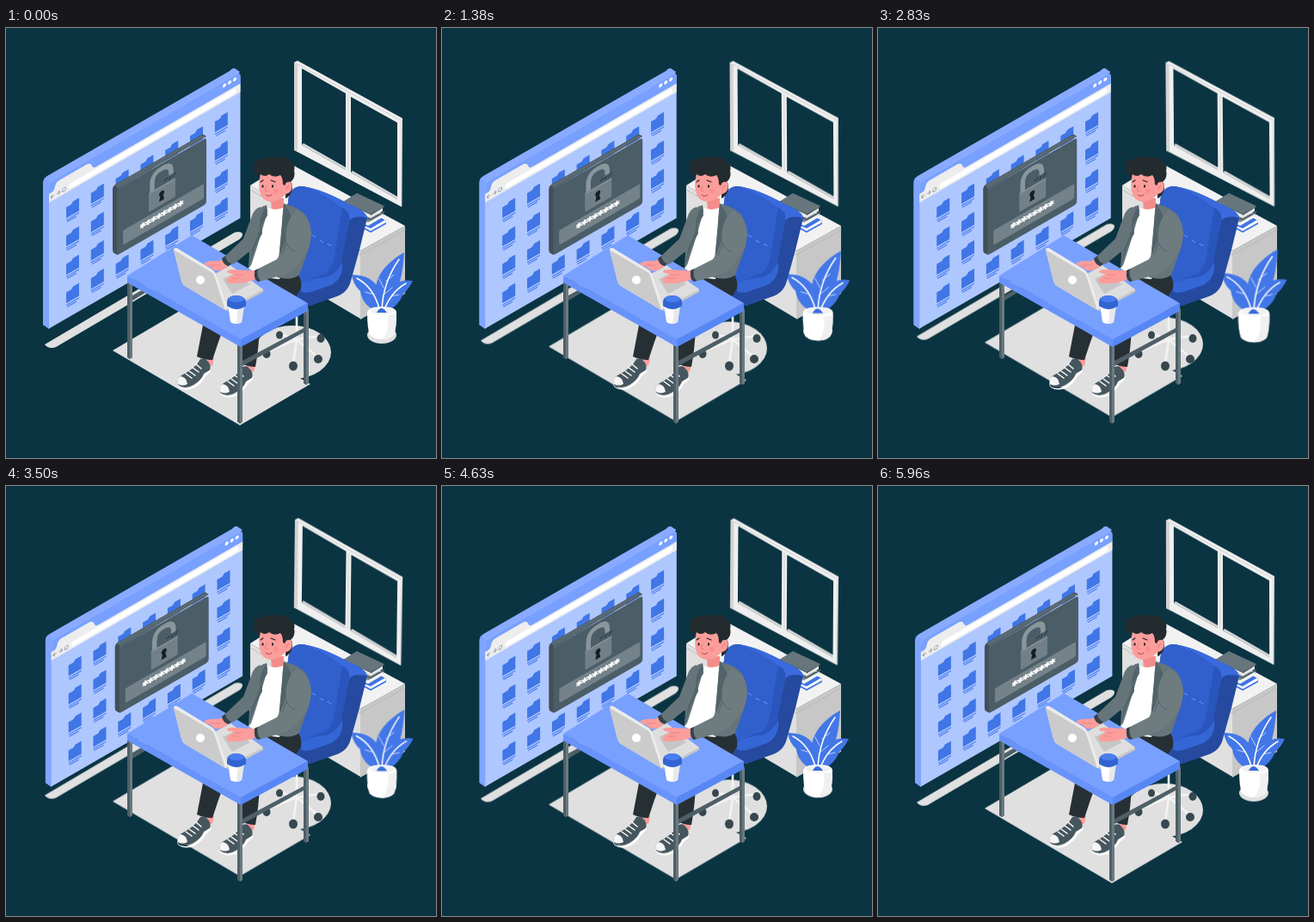
Write an HTML page that moves like this. It is 500 px wide and 500 px high and loops after 6 s.

```html
<!DOCTYPE html>
<html lang="en">
<head>
<meta charset="utf-8">
<title>Password screen</title>
<style>
html, body { margin: 0; width: 100%; height: 100%; overflow: hidden; background: #0b3442; }
svg { display: block; width: 100vw; height: 100vh; }
.pin { font: bold 12px "DejaVu Sans", sans-serif; fill: #fff; stroke: #fff; stroke-width: .7px; }
.line { fill: none; stroke-linecap: round; stroke-linejoin: round; }
#window { transform-origin: 398px 123px; }
#plant { transform-origin: 437px 313px; }
</style>
</head>
<body>
<svg viewBox="0 0 500 500">
  <defs>
    <g id="folder">
      <path d="M-7-5.500H-1L1-8H8V7H-7z" fill="#4076e6"/>
      <path d="M-7 9.300H8M-6 11.800H5" stroke="#4f82ee" stroke-width="1.400"/>
    </g>
    <g id="shoe">
      <path d="M35 0Q33-4 27-2L23 4Q15 12 5 17Q-1 21 1 28Q9 34 19 28Q28 23 31 15L38 11Q40 4 35 0z" fill="#46565e"/>
      <path d="M1 24Q0 30 4 31Q13 34 21 28Q28 23 32 15L39 10V13L33 18Q29 26 21 31Q10 36 2 31Q-1 28 1 24z" fill="#fff"/>
      <path d="M4 18Q-1 21 1 27Q6 30 12 27Q11 19 4 18z" fill="#f5f5f5"/>
      <path class="line" d="M10 15L17 20M14 12L21 17M18 8L25 13M22 4L28 9" stroke="#fff" stroke-width="1.500"/>
    </g>
  </defs>

  <!-- floor shadows -->
  <g id="floor" fill="#e0e0e0">
    <path d="M45 368L262 240Q268 235 274 238Q277 241 271 246L58 371Q50 374 45 368z"/>
    <path d="M124 375L202 329L354 414L272 462z"/>
    <ellipse cx="333" cy="377" rx="45" ry="31"/>
    <ellipse cx="437" cy="357" rx="17" ry="10"/>
  </g>

  <!-- window -->
  <g id="window">
    <path fill-rule="evenodd" fill="#efefef" d="M335 40L339 38L461 105L460 208L335 142zM344 47V136L395 165V76zM401 80V168L455 199V110z"/>
    <path d="M335 40L339 42V144L335 142z" fill="#d2d2d2"/>
    <path d="M344 136L395 165V162L346 134zM401 168L455 199V196L403 166z" fill="#d8d8d8"/>
    <path class="line" d="M339 42L460 108V207M398 78V166" stroke="#c9c9c9" stroke-width=".8"/>
  </g>

  <!-- browser screen -->
  <g id="screen">
    <path d="M43 182Q43 175 48 172L260 50Q264 46 266 47L272 51L50 350L43 345z" fill="#89abff"/>
    <path d="M43 182Q43 177 45 174L51 179V349L43 345z" fill="#7fa5ff"/>
    <g transform="matrix(1 -.577 0 1 50 180)">
      <path d="M0 6Q0 0 6 0H218Q222.500 0 222.500 5V169.500H0z" fill="#afc7ff"/>
      <path d="M0 6Q0 0 6 0H218Q222.500 0 222.500 5V14H0z" fill="#78a0ff"/>
      <path d="M0 13H3Q6 13 7 8Q8 4 12 4H44Q48 4 50 9Q51 13 55 13H222.500V23H0z" fill="#ededed"/>
      <rect x="23" y="15" width="195" height="6" rx="3" fill="#fff"/>
      <path class="line" d="M2 18H6M2 18L4 16M2 18L4 20M9 18H13M13 18L11 16M13 18L11 20" stroke="#8a979d" stroke-width=".8"/>
      <circle cx="17.500" cy="18" r="2" fill="none" stroke="#8a979d" stroke-width=".8"/>
      <g fill="#fff"><circle cx="204" cy="4.500" r="2"/><circle cx="210" cy="4.500" r="2"/><circle cx="216" cy="4.500" r="2"/></g>
      <g id="folders"></g>
    </g>
    <path d="M124 187Q124 184 127 182L226 125Q228 123 230 124L233 126L130 187V264L126 262Q124 261 124 258z" fill="#414f57"/>
    <path d="M126 183L227 125Q229 124 232 126L130 186z" fill="#5a6a72"/>
    <g transform="matrix(1 -.577 0 1 50 180)">
      <rect x="79" y="53" width="104" height="77" rx="3" fill="#4b5d66"/>
      <rect x="86" y="105" width="94" height="17" rx="2" fill="#74828a"/>
      <text class="pin" x="106" y="118.500">********</text>
      <path class="line" d="M120 80V70Q120 59 131 59Q142 59 142 69V72" stroke="#89969c" stroke-width="5.500" style="stroke-linecap: butt"/>
      <rect x="116" y="79" width="31" height="22" rx="1.500" fill="#717f86"/>
      <path d="M116 81Q116 79 118 79H147V81z" fill="#849096"/>
      <path d="M131 85a3 3 0 0 1 1.700 5.500L134 96H128L129.300 90.500A3 3 0 0 1 131 85z" fill="#142026"/>
      <path class="line" d="M134 75L138 74M140 77L141 74M144 76L147 73" stroke="#202d34" stroke-width="1"/>
    </g>
  </g>

  <!-- cabinet and books -->
  <path d="M284 183L412 259V338L284 262z" fill="#e0e0e0"/>
  <path d="M412 259L464 230V309L412 339z" fill="#c7c7c7"/>
  <path d="M284 183L327 156L464 230L412 259z" fill="#f2f2f2"/>
  <path class="line" d="M284 188L412 264L464 235" stroke="#b5b5b5" stroke-width=".8"/>
  <g>
    <path d="M413 228L431 218L442 224L424 235z" fill="#3f74e5"/>
    <path d="M414 229L424 233L441 223V226L424 236L414 231z" fill="#fff"/>
    <path d="M413 230L424 236L442 226V228L424 238L413 232z" fill="#3f74e5"/>
    <path d="M399 215L416 206L439 218L421 228z" fill="#7d8a8f"/>
    <path d="M400 216L421 226L438 216V220L421 230L400 219z" fill="#f5f5f5"/>
    <path d="M392 202L408 192L440 207L424 217z" fill="#66767c"/>
    <path d="M393 203L424 217L438 208V213L424 221L393 207z" fill="#e7e7e7"/>
    <path d="M392 202L424 217V218L440 208V207L424 216z" fill="#4b5c63"/>
    <path d="M392 207L424 222L440 213V215L424 224L392 209z" fill="#53646b"/>
  </g>

  <!-- plant -->
  <g id="plant">
    <g fill="#4377e7">
      <path d="M433 331Q422 297 443 276Q453 266 463 261Q462 278 459 291Q453 316 440 331z"/>
      <path d="M434 331Q414 323 412 306Q404 299 402 287Q421 287 430 298Q440 311 439 331z"/>
      <path d="M438 331Q438 304 452 297Q462 292 473 294Q468 304 462 309Q457 323 440 332z"/>
    </g>
    <path class="line" d="M437 329Q438 296 457 269M434 326Q427 301 408 291M439 330Q447 307 465 297" stroke="#fff" stroke-width="1.500"/>
    <path class="line" d="M439 302L434 292M442 294L451 287M438 311L449 302M428 310L418 307M448 312L457 310" stroke="#dce7ff" stroke-width=".8"/>
    <path d="M420 331Q421 324 437 324Q454 324 454 331Q454 350 451 357Q446 362 437 362Q428 362 423 357Q420 349 420 331z" fill="#fff"/>
    <path d="M444 334Q454 334 454 331Q454 350 451 357Q446 362 437 362Q446 353 444 334z" fill="#f0f0f0"/>
    <ellipse cx="437.500" cy="329" rx="14" ry="4" fill="#f1f1f1"/>
    <path d="M431 331Q436 321 443 331z" fill="#386bdc"/>
  </g>

  <!-- chair -->
  <path class="line" d="M338 330V365M338 362L319 356M338 362L304 376M338 362L334 390M338 362L363 383M338 362L366 358" stroke="#f3f3f3" stroke-width="2.600"/>
  <g fill="#37474f">
    <ellipse cx="318" cy="357" rx="4" ry="4.500"/><ellipse cx="303" cy="379" rx="4.500" ry="5"/>
    <ellipse cx="334" cy="393" rx="5" ry="5.500"/><ellipse cx="363" cy="385" rx="5" ry="5"/><ellipse cx="366" cy="361" rx="4.500" ry="5"/>
  </g>
  <path d="M328 203Q329 184 344 184Q367 187 399 205Q419 213 420 221L411 258L401 294Q397 309 382 313L354 323Q344 325 328 312L300 294z" fill="#254a9f"/>
  <path d="M328 203Q329 184 344 184Q367 187 391 208Q401 212 399 224L389 276Q384 291 364 298L348 305L315 294z" fill="#3160cd"/>
  <path d="M344 184Q367 187 399 205Q418 212 420 221Q406 217 399 224Q399 213 391 209Q367 190 344 184z" fill="#3a6ade"/>
  <path d="M391 209Q401 213 399 224L389 276Q384 291 364 298L346 305L344 299Q358 288 370 286Q380 282 383 258z" fill="#2a55bd"/>
  <path d="M343 298Q358 290 372 290Q385 286 391 272Q393 291 378 299L355 307Q346 309 343 306z" fill="#3566d6"/>
  <path class="line" d="M356 241L360 243M365 247L369 249M374 251L378 253" stroke="#5a8bf5" stroke-width="1.300"/>

  <!-- legs and shoes -->
  <path d="M234 383L242 383L240 393L232 391zM280 389L290 391L288 400L279 399z" fill="#fb9b99"/>
  <path d="M230 340L254 346L247 365L240 386Q230 386 222 382zM266 350L295 347Q294 373 290 394Q281 394 274 390z" fill="#263034"/>
  <path d="M283 276L337 284Q345 291 343 303L334 317L280 290z" fill="#263034"/>
  <use href="#shoe" transform="translate(199 387)"/>
  <use href="#shoe" transform="translate(248 396)"/>

  <!-- torso -->
  <path d="M308 198H323V218L309 217z" fill="#f28d8c"/>
  <path d="M302 208Q314 214 324 208L332 222L318 292Q300 292 282 280z" fill="#fff"/>
  <path d="M303 206Q294 207 289 219L277 250L283 262L282 278Q284 279 286 273Q297 240 304 213z" fill="#66757a"/>
  <path d="M323 204Q341 209 348 217Q357 230 353 254L341 287Q333 294 315 290Q320 249 322 214z" fill="#66757a"/>
  <path d="M303 206L304 218L297 229L298 239Q289 252 283 277Q287 241 299 213zM323 204Q334 218 333 229L327 234L329 240Q317 260 315 290Q319 249 322 214z" fill="#53636a"/>

  <!-- table -->
  <g fill="#4e5f67">
    <path d="M147 311L165 301V306L147 317z"/>
    <path d="M275 387L346 349V354L275 393z"/>
    <path d="M141 290H147V383L144 385L141 383z"/>
    <path d="M269 366H275V458L272 460L269 458z"/>
    <path d="M346 326H352V413L349 415L346 413z"/>
  </g>
  <path d="M144 298V385L147 383V298zM272 370V460L275 458V370zM349 328V415L352 413V328z" fill="#6b7a80"/>
  <path d="M141 288L273 361V371L141 296z" fill="#6893fb"/>
  <path d="M273 361L351 320V329L273 371z" fill="#5787f5"/>
  <path d="M141 288L216 241L351 320L273 362z" fill="#78a0ff"/>

  <!-- laptop -->
  <path d="M243 286L261 276L299 304V307L258 329L253 327z" fill="#c6c6c6"/>
  <path d="M243 286L261 276L299 304L258 326z" fill="#dedede"/>
  <path d="M252 292L266 285L284 298L263 309z" fill="#c6c6c6"/>
  <path d="M195 258Q195 255 199 256L240 281Q243 283 244 286L258 326L255 328L208 300Q205 298 204 294z" fill="#ececec"/>
  <path d="M195 258L239 284Q241 285 242 288L255 328L208 300Q205 298 204 294z" fill="#cbcbcb"/>
  <circle cx="226" cy="293" r="5" fill="#fff"/>

  <!-- arms and hands -->
  <path d="M255 268L247 271Q237 270 231 273Q229 276 236 277L243 282Q253 284 261 274z" fill="#fb9d9b"/>
  <path d="M296 208Q288 210 285 221L276 245L255 265Q250 270 256 274Q263 277 268 272L284 259Q291 249 295 234z" fill="#66757a"/>
  <path d="M251 268Q252 275 259 277L262 274Q256 272 255 265z" fill="#34434a"/>
  <path d="M291 282Q278 282 268 281Q258 280 257 283Q258 286 266 286L257 291Q255 296 260 297Q279 298 293 291z" fill="#fb9d9b"/>
  <path class="line" d="M266 287L275 287M263 291L271 291M238 276L248 276" stroke="#e57f82" stroke-width=".8"/>
  <path d="M338 212Q354 220 355 239Q354 257 343 270Q335 284 316 289L293 295Q288 293 289 282L315 269L326 250Q323 226 338 212z" fill="#6e7c80"/>
  <path d="M289 282Q288 293 293 295L296 294Q291 289 293 280z" fill="#34434a"/>
  <path class="line" d="M326 250Q329 258 336 260M326 251L321 264" stroke="#53636a" stroke-width="1"/>

  <!-- head -->
  <path d="M325 178Q334 176 333 187Q331 196 325 198z" fill="#232b2f"/>
  <path d="M296 169Q293 182 295 190Q297 201 308 202Q318 201 324 194L330 191Q335 184 331 179L326 166z" fill="#fb9d9b"/>
  <path d="M290 170Q286 164 289 158Q289 152 297 153Q301 148 309 151Q316 147 321 151Q328 150 331 156Q337 159 335 166Q337 174 331 179Q328 178 326 184L322 182Q322 174 319 171Q312 175 306 170Q301 174 296 170Q293 173 290 170z" fill="#232b2f"/>
  <ellipse cx="328" cy="185" rx="4" ry="6" fill="#fb9d9b"/>
  <path class="line" d="M326 188Q327 182 330 184" stroke="#df777b" stroke-width=".8"/>
  <ellipse cx="298.500" cy="184" rx="1.100" ry="1.700" fill="#222"/>
  <ellipse cx="310" cy="184" rx="1.100" ry="1.700" fill="#222"/>
  <path class="line" d="M296 179L299 177M308 177L313 179" stroke="#222" stroke-width="1.200"/>
  <path class="line" d="M303 184L301 189L304 190" stroke="#e47a7d" stroke-width=".9"/>
  <path class="line" d="M302 194Q305 197 309 194" stroke="#a6484e" stroke-width="1"/>
  <circle cx="314" cy="190" r="3" fill="#f88688" opacity=".6"/>

  <!-- cup -->
  <path d="M258 321H277L274 342Q267 346 261 342z" fill="#fff"/>
  <path d="M270 323H277L274 342Q271 344 268 344z" fill="#e9e9e9"/>
  <path d="M257 319Q257 315 260 313Q267 309 275 313Q279 315 279 319V323Q268 331 257 323z" fill="#3164d2"/>
  <ellipse cx="268" cy="315" rx="9" ry="4" fill="#4a7eee"/>
</svg>
<script>
const byId = id => document.getElementById(id);

const cells = [];
for (let row = 0; row < 4; row++)
  for (let col = 0; col < 7; col++)
    cells.push(`<use href="#folder" x="${27 + 28.8 * col}" y="${45.6 + 33 * row}"/>`);
byId("folders").innerHTML = cells.join("");

// steps: [offset, value]
function loop(id, duration, steps, toTransform) {
  const keys = steps.map(([offset, value]) => ({ offset, transform: toTransform(value) }));
  byId(id).animate(keys, { duration, iterations: Infinity, easing: "linear" });
}

loop("screen", 6000,
  [[0, 0], [.1, -1], [.2, 2], [.3, -4], [.4, 4], [.5, -4], [.6, 4], [.7, -4], [.8, 2], [.9, -1], [1, 0]],
  x => `translateX(${x}px)`);
loop("floor", 6000, [[0, 0], [.5, -10], [1, 0]], y => `translateY(${y}px)`);
loop("window", 1500, [[0, 0], [.25, 1], [.75, -1], [1, 0]], a => `rotate(${a}deg)`);
loop("plant", 6000,
  [[0, 1], [.1, 1.1], [.3, 1], [.4, 1], [.5, 1.1], [.6, 1], [1, 1]],
  s => `scale(${s})`);
</script>
</body>
</html>
```
